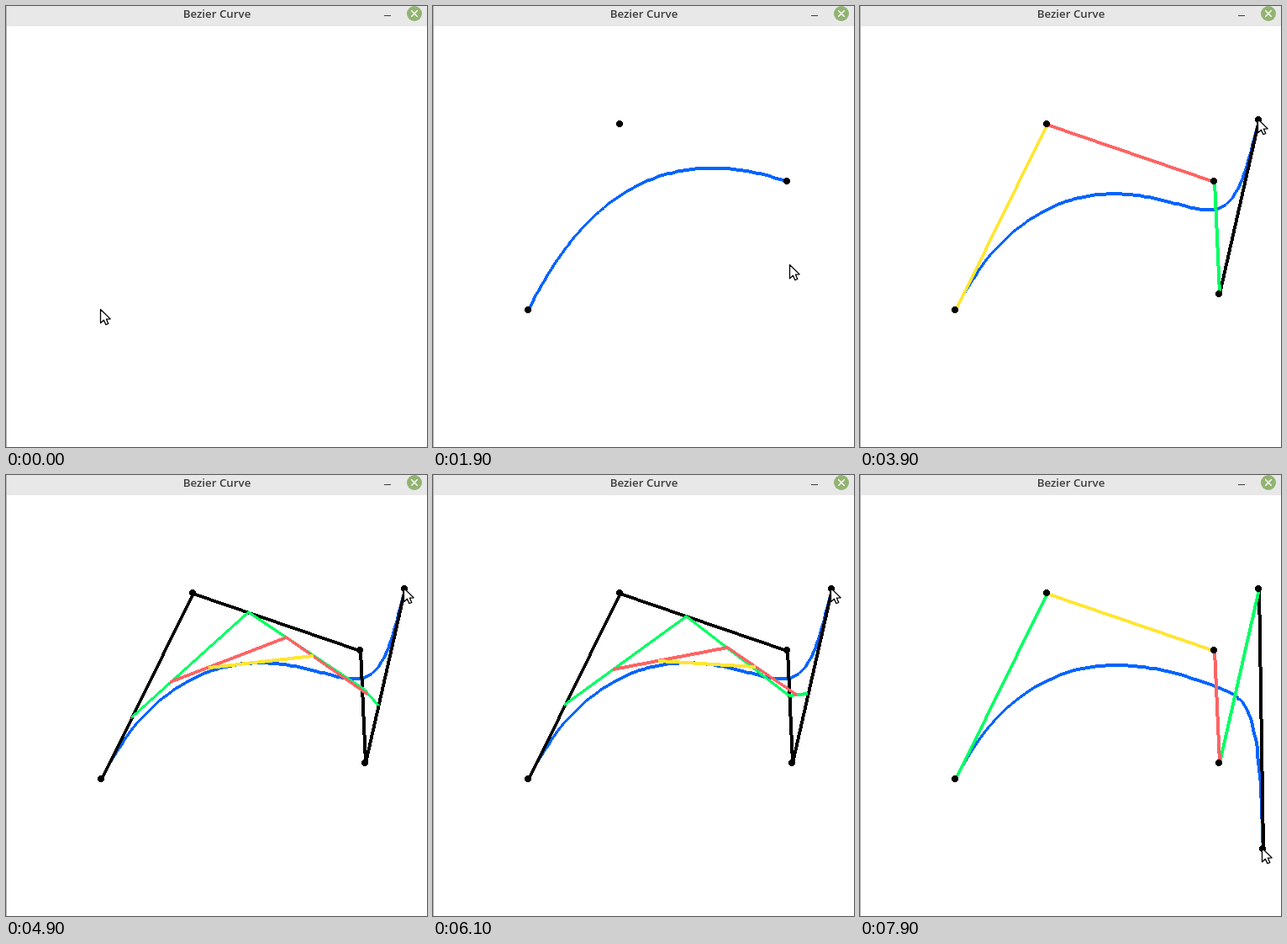
Animation of 501 by 524 pixels, one loop 8000 ms. Source, as an HTML page with a canvas:

```html
<!DOCTYPE html>
<html lang="en">
<head>
<meta charset="utf-8">
<title>Bezier Curve</title>
<style>
  html, body { margin: 0; width: 501px; height: 524px; overflow: hidden; background: #fff; }
  canvas { display: block; }
</style>
</head>
<body>
<canvas id="stage" width="501" height="524"></canvas>
<script>
const ctx = document.getElementById('stage').getContext('2d');
const LOOP = 8000, TICK = 100, LINE = 4;
const LEVEL_COLORS = ['#00ff64', '#ff6464', '#ffe632'];

// Each control point: its place, when the pointer sets off for it,
// when it is clicked, and the point the pointer's path bends towards.
const stops = [
  { at: [113, 361], leave: 0, click: 100 },
  { at: [222, 140], leave: 200, click: 700 },
  { at: [421, 208], leave: 700, click: 1500, bend: [350, 103] },
  { at: [427, 342], leave: 1600, click: 2200 },
  { at: [474, 135], leave: 2300, click: 3200, bend: [330, 22] },
  { at: [479, 444], leave: 7400, click: 7900, bend: [507, 270] }
];

const mix = (a, b, t) => a + (b - a) * t;
const mixPoint = (p, q, t) => [mix(p[0], q[0], t), mix(p[1], q[1], t)];
const reduce = (pts, t) => pts.slice(1).map((p, i) => mixPoint(pts[i], p, t));
const bezier = (pts, t) => pts.length > 1 ? bezier(reduce(pts, t), t) : pts[0];

function pointerAt(time) {
  const i = stops.findLastIndex(s => s.leave <= time);
  const { at, leave, click, bend } = stops[i];
  const from = stops[Math.max(0, i - 1)].at;
  const u = Math.min(1, (time - leave) / (click - TICK - leave || 1));
  const path = bend ? [from, bend, at] : [from, at];
  return bezier(i ? path : [at], 1 - (1 - u) ** 1.5).map(Math.round);
}

// Construction parameter: up in three ticks, later back down in flicks of 0.3.
function parameterAt(time) {
  if (time < 5400) return Math.min(1, Math.max(0, (time - 4800) / 300));
  if (time >= 6600) return 0;
  return 1 - 0.3 * Math.floor((time - 5400) / 300);
}

// Hard-edged line, thickened along its minor axis.
function line(p, q) {
  const [x0, y0] = p.map(Math.floor), [x1, y1] = q.map(Math.floor);
  const dx = x1 - x0, dy = y1 - y0;
  const steep = Math.abs(dy) >= Math.abs(dx);
  const n = Math.max(Math.abs(dx), Math.abs(dy));
  for (let i = 0; i <= n; i++) {
    const x = x0 + Math.round(n && dx * i / n);
    const y = y0 + Math.round(n && dy * i / n);
    if (steep) ctx.fillRect(x - 1, y, LINE, 1);
    else ctx.fillRect(x, y - 1, 1, LINE);
  }
}

function polyline(pts, color) {
  ctx.fillStyle = color;
  for (let i = 1; i < pts.length; i++) line(pts[i - 1], pts[i]);
}

function drawCurve(pts) {
  const n = pts.length === 2 ? 1 : 100;
  polyline(Array.from({ length: n + 1 }, (_, i) => bezier(pts, i / n)), '#0064ff');
}

function drawConstruction(pts, t) {
  for (let level = 0; pts.length > 1; level++) {
    polyline(pts, level ? LEVEL_COLORS[(level - 1) % 3] : '#000');
    pts = reduce(pts, t);
  }
}

function drawDot([x, y]) {
  ctx.fillStyle = '#000';
  for (const r of [2, 3, 4]) ctx.fillRect(x - r, y - 6 + r, 2 * r, 12 - 2 * r);
}

function drawPointer([x, y]) {
  const shape = [[0, 0], [0, 16.3], [3.9, 12.8], [6.4, 18.2], [9.3, 17], [6.9, 11.6], [11.7, 11.4]];
  ctx.save();
  ctx.translate(x - 0.5, y - 0.5);
  ctx.beginPath();
  shape.forEach(([px, py]) => ctx.lineTo(px, py));
  ctx.closePath();
  ctx.fillStyle = '#fff';
  ctx.fill();
  ctx.strokeStyle = '#000';
  ctx.lineWidth = 1.3;
  ctx.lineJoin = 'round';
  ctx.stroke();
  ctx.restore();
}

function drawWindow() {
  ctx.fillStyle = '#fff';
  ctx.fillRect(0, 0, 501, 524);
  ctx.fillStyle = '#e8e8e8';
  ctx.fillRect(0, 0, 501, 24);
  ctx.fillStyle = '#b4b4b4';
  ctx.fillRect(0, 0, 1, 524);
  ctx.fillStyle = '#3c3c3c';
  ctx.font = '600 13.3px "Open Sans", sans-serif';
  ctx.textAlign = 'center';
  ctx.fillText('Bezier Curve', 251, 14);
  ctx.fillRect(450, 11, 8, 1);
  ctx.beginPath();
  ctx.arc(486, 9, 9, 0, 7);
  ctx.fillStyle = '#92b372';
  ctx.fill();
  ctx.beginPath();
  for (const s of [-1, 1]) {
    ctx.moveTo(482.3, 9 - 3.7 * s);
    ctx.lineTo(489.7, 9 + 3.7 * s);
  }
  ctx.strokeStyle = '#fff';
  ctx.lineWidth = 1.4;
  ctx.stroke();
}

function draw(now) {
  const time = Math.floor((now % LOOP) / TICK) * TICK;
  const pts = stops.filter(s => s.click <= time).map(s => s.at);
  drawWindow();
  if (pts.length > 1) drawCurve(pts);
  if (time >= 3900) drawConstruction(pts, parameterAt(time));
  pts.forEach(drawDot);
  drawPointer(pointerAt(time));
}

let start;
function frame(now) {
  start ??= now;
  draw(Math.max(0, now - start));
  requestAnimationFrame(frame);
}
draw(0);
requestAnimationFrame(frame);
</script>
</body>
</html>
```
